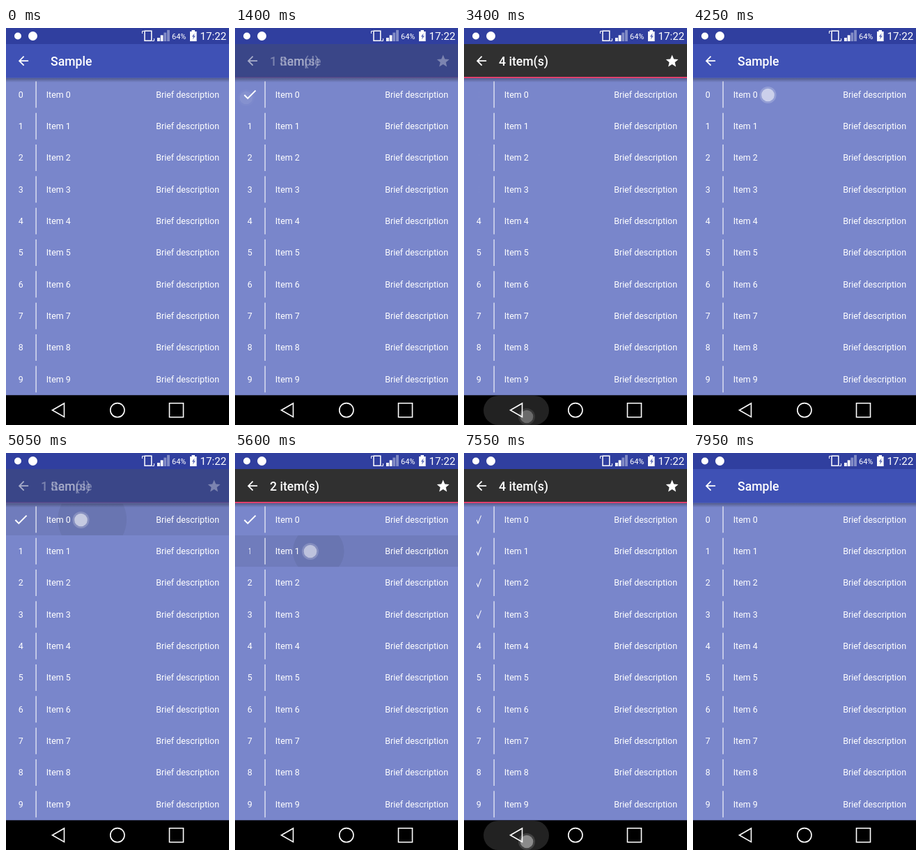
These frames come from a looping animation (320x569 px, 8000 ms). An HTML page with a canvas:

```html
<!DOCTYPE html>
<html lang="en">
<head>
<meta charset="utf-8">
<title>List selection</title>
<style>
  html, body { margin: 0; width: 100%; height: 100%; overflow: hidden; background: #000; }
  canvas { display: block; width: 100vw; height: 100vh; }
</style>
</head>
<body>
<canvas id="stage"></canvas>
<script>
const W = 320, H = 569, LOOP = 8000;
const ROW_TOP = 72.7, ROW_H = 45.33, ROWS = 10, FLIP = 250, TAP_FADE = 200;

const canvas = document.getElementById('stage');
const ctx = canvas.getContext('2d');

// Each session selects rows 0..3 one after another, then is closed with Back.
const sessions = [
  { taps: [1100, 1550, 2000, 2450], end: 3275 },
  { taps: [4750, 5550, 6050, 6450], end: 7475 },
];
const touches = [
  { x: 16, y: 100, down: 1100, up: 1230 },
  { x: 20, y: 141, down: 1500, up: 1600 },
  { x: 21.3, y: 187, down: 1950, up: 2050 },
  { x: 21, y: 232, down: 2450, up: 2530 },
  { x: 90, y: 557, down: 3200, up: 3300 },
  { x: 107.5, y: 96, down: 4250, up: 5080 },
  { x: 108, y: 141, down: 5450, up: 5580 },
  { x: 110, y: 186, down: 5950, up: 6100 },
  { x: 112, y: 230, down: 6350, up: 6500 },
  { x: 90, y: 557, down: 7400, up: 7500 },
];
const ripples = [
  { row: 0, x: 108, down: 4250, up: 5050 },
  { row: 1, x: 108, down: 5450, up: 5550 },
  { row: 2, x: 110, down: 5950, up: 6050 },
  { row: 3, x: 112, down: 6350, up: 6450 },
];

const icons = {
  check: new Path2D('M9 16.17 4.83 12l-1.42 1.41L9 19 21 7l-1.41-1.41z'),
  back: new Path2D('M20 11H7.83l5.59-5.59L12 4l-8 8 8 8 1.41-1.41L7.83 13H20z'),
  star: new Path2D('M12 17.27 18.18 21l-1.64-7.03L22 9.24l-7.19-.61L12 2 9.19 8.63 2 9.24l5.46 4.73L5.82 21z'),
  bolt: new Path2D('M270.6 7.5 266.8 12.6h2.2l-1 4 3.8-5.4h-2.2z'),
};

const clamp = v => Math.max(0, Math.min(1, v));
const white = a => `rgba(255,255,255,${a})`;
const black = a => `rgba(0,0,0,${a})`;

function rect(x, y, w, h, color) {
  ctx.fillStyle = color;
  ctx.fillRect(x, y, w, h);
}

function disc(x, y, r, color) {
  ctx.fillStyle = color;
  ctx.beginPath();
  ctx.arc(x, y, r, 0, Math.PI * 2);
  ctx.fill();
}

function text(str, x, y, size, { weight = 400, align = 'left' } = {}) {
  ctx.font = `${weight} ${size}px Roboto, sans-serif`;
  ctx.textAlign = align;
  ctx.fillStyle = '#fff';
  ctx.fillText(str, x, y);
}

function icon(path, x, y, sx, sy = sx) {
  ctx.save();
  ctx.translate(x, y);
  ctx.scale(sx, sy);
  ctx.translate(-12, -12);
  ctx.fillStyle = '#fff';
  ctx.fill(path);
  ctx.restore();
}

function withAlpha(alpha, draw) {
  if (alpha <= 0) return;
  ctx.save();
  ctx.globalAlpha = alpha;
  draw();
  ctx.restore();
}

function drawStatusBar() {
  rect(0, 0, W, 23, '#303f9f');
  disc(17, 11.5, 5, '#fff');
  disc(38.5, 11.5, 6.5, '#fff');

  ctx.strokeStyle = '#fff';
  ctx.lineWidth = 1.5;
  ctx.strokeRect(199, 4.2, 9.8, 14);
  ctx.lineWidth = 1;
  ctx.beginPath();
  ctx.moveTo(195.5, 8); ctx.lineTo(195.5, 4.5); ctx.lineTo(198, 4.5);
  ctx.moveTo(210, 18.5); ctx.lineTo(212.5, 18.5); ctx.lineTo(212.5, 15);
  ctx.stroke();

  for (let i = 0; i < 4; i++) {
    const h = 5 + i * 3.7;
    rect(217 + i * 4.7, 19 - h, 3.8, h, white(i < 2 ? 1 : 0.4));
  }
  text('64%', 238, 16, 11);
  rect(266.5, 3, 4.5, 2, '#fff');
  rect(264, 5, 9.6, 14, '#fff');
  ctx.fillStyle = '#5967b5';
  ctx.fill(icons.bolt);
  text('17:22', 278.5, 17, 15.2);
}

// Progress of the selection bar (0 hidden, 1 shown) and its item count.
function modeState(t) {
  const s = sessions.findLast(s => t >= s.taps[0]);
  if (!s) return { shown: 0, count: 0 };
  const shown = clamp((t - s.taps[0] - 200) / 300) * (1 - clamp((t - s.end - 175) / 275));
  return { shown, count: s.taps.filter(at => t >= at).length };
}

function drawToolbar(t) {
  const { shown, count } = modeState(t);
  const mix = (a, b) => Math.round(a + (b - a) * shown);
  const shadow = ctx.createLinearGradient(0, 71.5, 0, 78);
  shadow.addColorStop(0, black(0.33));
  shadow.addColorStop(1, black(0));
  rect(0, 71.5, W, 6.5, shadow);
  rect(0, 23, W, 48.5, `rgb(${mix(63, 48)},${mix(81, 48)},${mix(181, 48)})`);

  const title = { weight: 500 };
  withAlpha(clamp(1 - 2 * shown), () => {
    icon(icons.back, 25, 47.2, 0.889);
    text('Sample', 64, 53.8, 17.6, title);
  });
  withAlpha(shown, () => {
    icon(icons.back, 25, 47.2, 0.889);
    text(`${count} item(s)`, 50, 53.8, 17.6, title);
    icon(icons.star, 298.6, 47.4, 0.889);
  });
  withAlpha(shown ** 2, () => rect(0, 70, W, 1.8, '#f0406f'));
}

function rowFlip(row, t) {
  let at = -Infinity, checked = false;
  for (const s of sessions) {
    if (row >= s.taps.length) break;
    if (t >= s.taps[row]) [at, checked] = [s.taps[row], true];
    if (t >= s.end) [at, checked] = [s.end, false];
  }
  const k = clamp((t - at) / FLIP);
  return { checked: k < 0.5 ? !checked : checked, width: Math.abs(1 - 2 * k) };
}

function drawRipple({ row, x, down, up }, t) {
  const k = clamp((t - up) / 400);
  if (t < down || k === 1) return;
  const held = 0.3 * (Math.min(t, up) - down) / 800;
  const p = held + (1 - held) * (1 - (1 - k) ** 1.6);
  const top = ROW_TOP + row * ROW_H;
  ctx.save();
  ctx.beginPath();
  ctx.rect(0, top, W, ROW_H);
  ctx.clip();
  const strength = clamp((t - down) / 100) * (1 - k * k);
  rect(0, top, W, ROW_H, black(0.075 * strength));
  disc(x + (160 - x) * p, top + ROW_H / 2, 163 * p, black(0.06 * strength));
  ctx.restore();
}

function drawList(t) {
  rect(0, 71, W, 455.5, '#7986cb');
  ripples.forEach(r => drawRipple(r, t));
  for (let i = 0; i < ROWS; i++) {
    const mid = ROW_TOP + (i + 0.5) * ROW_H;
    const base = mid + 4.4;
    const { checked, width } = rowFlip(i, t);
    if (checked) {
      icon(icons.check, 21.3, mid, width, 1);
    } else if (width > 0) {
      ctx.save();
      ctx.translate(21.3, base);
      ctx.scale(width, 1);
      text(i, 0, 0, 12.44, { align: 'center' });
      ctx.restore();
    }
    rect(42.5, mid - 19, 1.2, 38, white(0.9));
    text(`Item ${i}`, 57.7, base, 12.44);
    text('Brief description', 306, base, 12.44, { align: 'right' });
  }
}

function drawNavBar(t) {
  rect(0, 526.5, W, 42.5, '#000');
  for (const { end } of sessions) {
    const age = t - end;
    const alpha = clamp((age + 75) / 100) * (1 - clamp((age - 150) / 200));
    withAlpha(alpha, () => {
      ctx.fillStyle = '#222';
      ctx.beginPath();
      ctx.roundRect(28, 527, 94, 42, 21);
      ctx.fill();
    });
  }
  ctx.strokeStyle = '#fff';
  ctx.lineWidth = 1.6;
  ctx.beginPath();
  ctx.moveTo(66.5, 547.7); ctx.lineTo(83.5, 538); ctx.lineTo(83.5, 557.4);
  ctx.closePath();
  ctx.moveTo(170, 547.7);
  ctx.arc(159.9, 547.7, 10.1, 0, Math.PI * 2);
  ctx.rect(234.5, 537.8, 20, 20);
  ctx.stroke();
}

function drawTouch({ x, y, down, up }, t) {
  if (t < down) return;
  withAlpha(1 - clamp((t - up) / TAP_FADE), () => {
    disc(x, y, 12, white(0.2));
    disc(x, y, 9.3, white(0.52));
  });
}

function frame(now) {
  const t = now % LOOP;
  const dpr = window.devicePixelRatio || 1;
  const w = Math.round(innerWidth * dpr), h = Math.round(innerHeight * dpr);
  if (canvas.width !== w || canvas.height !== h) {
    canvas.width = w;
    canvas.height = h;
  }
  ctx.setTransform(w / W, 0, 0, h / H, 0, 0);
  drawList(t);
  drawToolbar(t);
  drawStatusBar();
  drawNavBar(t);
  touches.forEach(touch => drawTouch(touch, t));
  requestAnimationFrame(frame);
}
requestAnimationFrame(frame);
</script>
</body>
</html>
```
